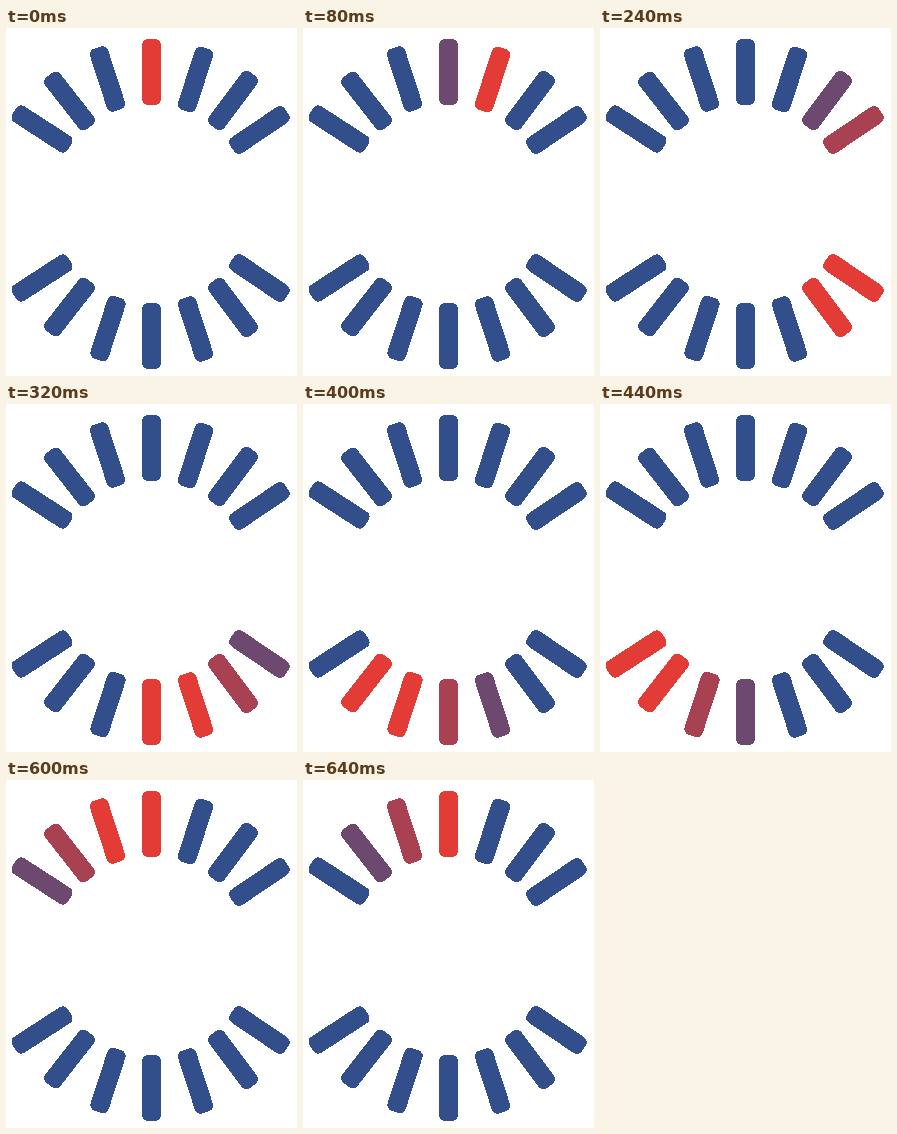
These frames come from a looping animation (291x348 px, 680 ms). An HTML page:

```html
<!DOCTYPE html>
<html lang="en">
<head>
<meta charset="utf-8">
<title>Spinner</title>
<style>
  html, body { margin: 0; width: 100%; height: 100%; overflow: hidden; background: #fff; }
  svg { display: block; width: 291px; height: 348px; }
</style>
</head>
<body>
<svg viewBox="0 0 291 348" shape-rendering="crispEdges"></svg>
<script>
const STEP = 40, STEPS = 17, FADE = 3;
const BLUE = [50, 79, 139], RED = [227, 60, 55];

// Centre x, centre y and tilt of each bar, clockwise from the top
const bars = [
  [145.5, 44, 0], [189.5, 51.5, 18], [227, 72.5, 37], [253.5, 102, 56],
  [253.5, 250, -56], [227, 279.5, -37], [189.5, 301, -18], [145.5, 308, 0],
  [102, 300.5, 18], [63.5, 279, 38], [36, 250, 57],
  [36, 101, -57], [63.5, 73, -38], [101.5, 51, -18]
];

// Red for two steps, ending at step `peak`, then a linear fade to blue
function glow(step, peak) {
  const d = step - peak;
  return d < -1 ? 0 : Math.min(1, Math.max(0, 1 - d / FADE));
}

// The top bar closes the lap and is already fading as the next one starts
function level(i, step) {
  return i ? glow(step, i + 2) : Math.max(glow(step, 0), glow(step, bars.length + 2));
}

function mix(t) {
  return `rgb(${BLUE.map((c, n) => Math.round(c + (RED[n] - c) * t)).join(",")})`;
}

const svg = document.querySelector("svg");
const start = document.timeline.currentTime || 0;

bars.forEach(([x, y, tilt], i) => {
  const bar = document.createElementNS(svg.namespaceURI, "rect");
  const attrs = {
    x: -9.5, y: -33, width: 19, height: 66, rx: 6,
    fill: mix(level(i, 0)),
    transform: `translate(${x} ${y}) rotate(${tilt})`
  };
  for (const name in attrs) bar.setAttribute(name, attrs[name]);
  svg.append(bar);

  const frames = Array.from({ length: STEPS + 1 }, (_, k) => ({
    offset: k / STEPS,
    fill: mix(level(i, k % STEPS)),
    easing: "steps(1, end)"
  }));
  bar.animate(frames, { duration: STEP * STEPS, iterations: Infinity }).startTime = start;
});
</script>
</body>
</html>
```
